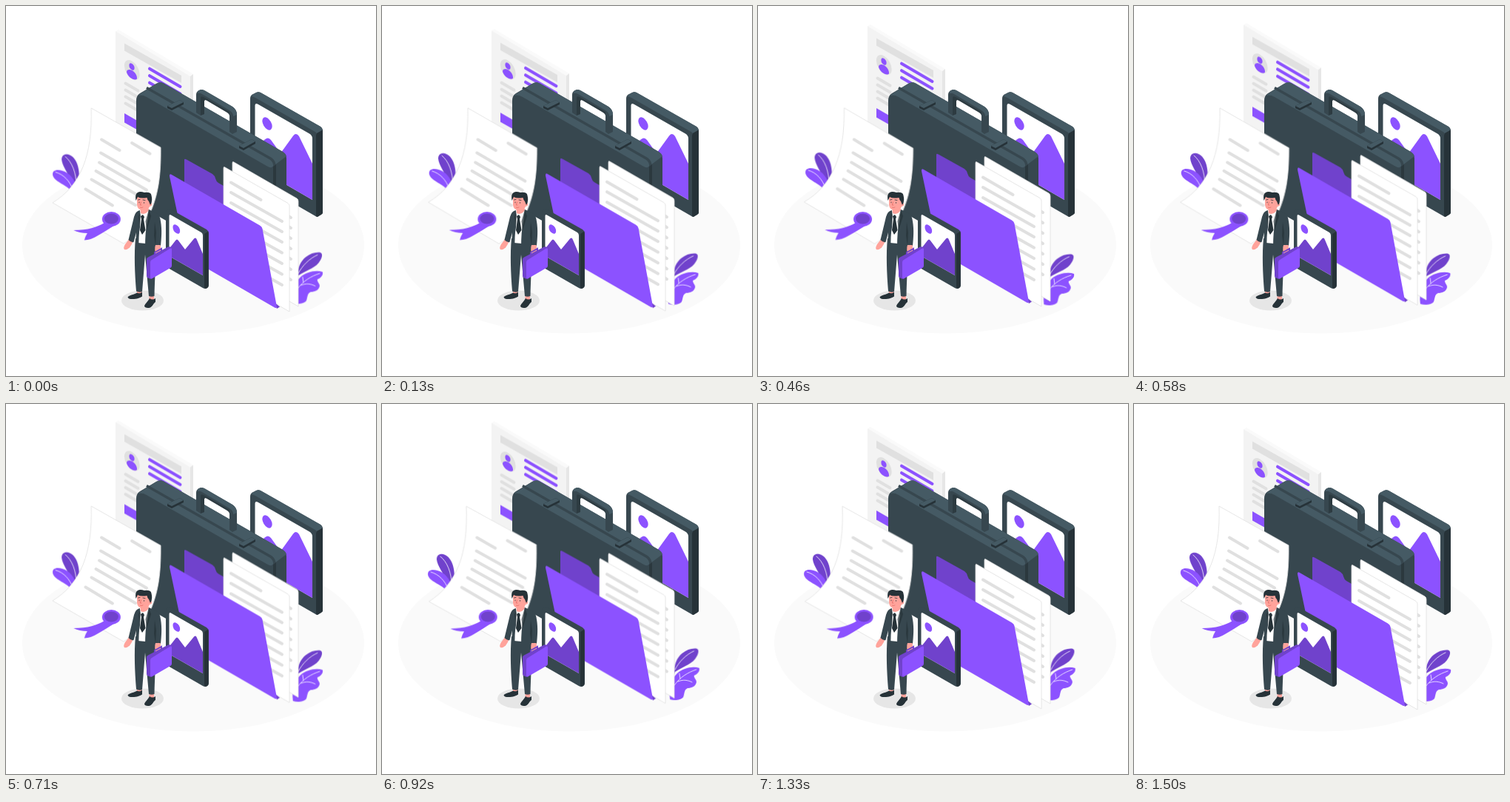
An HTML page for the animation above (1.54 s loop, 500x500 px).

```html
<!DOCTYPE html>
<html lang="en">
<head>
<meta charset="utf-8">
<title>Portfolio</title>
<style>
  html, body { margin: 0; width: 100%; height: 100%; overflow: hidden; background: #fff; }
  svg { display: block; width: 100vw; height: 100vh; }

  .float { animation: float 1540ms -30ms infinite ease-in-out; }
  .sway { animation: sway 1540ms -30ms infinite; transform-box: view-box; }
  .plants { transform-origin: 245.5px 300.5px; }
  .paper { transform-origin: 136px 229px; }

  @keyframes float {
    50% { transform: translateY(-9.6px); }
  }
  @keyframes sway {
    0% { transform: rotate(0); animation-timing-function: ease-out; }
    25% { transform: rotate(1deg); animation-timing-function: ease-in-out; }
    75% { transform: rotate(-1deg); animation-timing-function: ease-in; }
    100% { transform: rotate(0); }
  }

  .violet { fill: #8c52ff; }
  .plum { fill: #7042cc; }
  .ink { fill: #263238; }
  .slate { fill: #37474f; }
  .steel { fill: #455a64; }
  .white { fill: #fff; }
  .grey { fill: #e0e0e0; }
  .skin { fill: #ffa39b; }
  .sheet { fill: #fff; stroke: #e0e0e0; stroke-width: .8; stroke-linejoin: round; }
  .rules { fill: none; stroke: #e0e0e0; stroke-width: 4; stroke-linecap: round; }
  .rules.hot { stroke: #8c52ff; }
  .vein { fill: none; stroke: #fff; stroke-width: .8; stroke-linecap: round; }
</style>
</head>
<body>
<svg viewBox="0 0 500 500">
  <ellipse cx="253" cy="323" rx="231" ry="119.500" fill="#fafafa"/>

  <g class="sway plants">
    <path class="plum" d="M89 238C84 227 76 217 75 208C75 202 79 200 84 201C95 204 101 220 98 241L92 246Z"/>
    <path class="violet" d="M88 250C80 241 65 238 63 229C62 222 69 221 76 223C86 226 92 234 95 244Z"/>
    <path class="vein" d="M80 204C89 211 95 226 95 243M67 225C78 228 86 237 90 248"/>
    <path class="plum" d="M394 367C394 353 398 345 405 339C411 334 418 332 424 332.500C428 333 428 338 425 343C419 354 409 355 395 364Z"/>
    <path class="violet" d="M388 401C386 386 390 373 398 366C406 359 419 356 428 359C429 363 426 367 421 369C420 372 424 374 424 378C423 384 417 386 412 386C407 388 408 393 406 398C403 402 394 403 388 401Z"/>
    <path class="vein" d="M395 361C401 350 410 341 421 336M394 382C402 371 412 365 424 361M402 373L401 366M399 377C406 374 412 375 418 378"/>
  </g>

  <g class="float">
    <path fill="#fafafa" d="M148 34L152 32L253 92L249 95Z"/>
    <path fill="#e6e6e6" d="M249 95L253 92V200H249Z"/>
    <path fill="#f3f3f3" d="M148 34L249 95V250L148 190Z"/>
    <path class="grey" d="M160 50.500L237 94V104L160 60.500Z"/>
    <circle class="grey" r="12" transform="matrix(.866 .5 0 1 170.300 86.500)"/>
    <circle class="violet" r="4.200" transform="matrix(.866 .5 0 1 170 82)"/>
    <path class="violet" d="M163 89.500C163 85 168 85.500 171 87.500C175 90 177.500 94.500 177 98.500C174 101.500 165 97 163 89.500Z"/>
    <path class="rules hot" d="M194 84.700l41.500 24.300M194 94.200l41.500 24.300M194 103.700l41.500 24.300"/>
    <path class="rules" d="M161.500 104.500l17 10M161.500 113.500l17 10M161.500 122.500l17 10M161.500 131.500l17 10"/>
    <path class="violet" d="M160 145L200 168V180L160 157.500Z"/>
  </g>

  <g>
    <path class="slate" d="M330 125Q330 121 333 119.500L338 117Q341 115.500 344 117L425 163Q428 165 428 169V280L420 285L330 233Z"/>
    <path class="steel" d="M331 121.500L338 117Q341 115.500 344 117L425 163Q427 164.500 428 167.500L420 172Q419 170.500 416 169L337 124Q333 122 331 121.500Z"/>
    <path class="ink" d="M420 172L428 167.500V279Q428 281 426 282L421 285Q419 285 419 282V175Z"/>
    <path class="white" d="M336.500 135Q336.500 130 341 133L410 172.500Q414 175 414 179V262L336.500 217Z"/>
    <path class="violet" d="M336.500 193L349 181Q354 176 358 181L371 199L388 175.500Q392 170.500 396 176L414 213V262L336.500 217Z"/>
    <circle class="violet" r="7.700" transform="matrix(.866 .5 0 1 353 159)"/>
  </g>

  <g>
    <path class="slate" d="M176 128Q176 121 181 118L203 105Q208 102 213 104.500L374 197Q379 200 379 206V372H360L176 267Z"/>
    <path class="steel" d="M178 121L203 105Q208 102 213 104.500L374 197Q378 199.500 379 203L359 218Q357 219 352 216L190 123Q184 119.500 178 121Z"/>
    <path fill="none" stroke="#37474f" stroke-width="3.500" d="M190 110.500L358 206.500Q363 210 363 217"/>
    <path class="ink" d="M361 217L365 214V300H361Z" opacity=".7"/>
    <path class="ink" d="M218 135L235 127L240 130V133L224 141L218 138ZM315 189L332 180L337 183V186L321 195L315 192Z"/>
    <path class="steel" d="M218 135L235 127L240 130L224 138ZM315 189L332 180L337 183L321 192Z"/>
    <path class="slate" fill-rule="evenodd" d="M257 144V120Q257 116 260 114.500L263 113Q265 112.500 268 114L306 136Q312 140 312 147V170L306 173L302 170V148Q302 146 299 144L271 127.500Q268 126 268 129V146L263 148Z"/>
    <path class="steel" d="M259 115L263 113Q265 112.500 268 114L306 136Q312 140 312 147L307 149Q307 144 302 141L265 119Q262 117 259 118Z"/>
    <path class="ink" d="M263 124Q263 121 267 123L302 143V148Q302 146 299 144L271 127.500Q268 126 268 129V146L263 148Z" opacity=".55"/>
  </g>

  <g class="sway paper">
    <path class="sheet" d="M115 138L209 191C209.500 228 206 253 196 277C187 297 173 313 159 321L63 266C101 243 117 202 115 138Z"/>
    <path class="rules" d="M129 180.500l24.500 14.500M170 185l24.500 14.500M128 198.500L193.500 236M126 211.500L190 248.500M121.500 223L184 259M115.500 234.500L175 269M107.500 247.500L144 269.500"/>
    <path class="violet" d="M133 293C123 299 111 303 91.500 303Q99 307 110 307Q107 312 106 316.500Q115 316 123 311C132 306 139 301 146 297Z"/>
    <ellipse class="violet" cx="142.500" cy="288" rx="12.500" ry="10"/>
    <ellipse class="plum" cx="142.500" cy="287.500" rx="9.500" ry="7"/>
  </g>

  <g class="float">
    <path class="plum" d="M241 208Q241 206 244 207.500L279 227Q282 229 283 233Q284 237 287 239L346 273V320L241 260Z"/>
    <path class="sheet" d="M306 212Q306 209.500 308 211L393 260Q395 261 395 264V406L306 355Z"/>
    <path class="rules" d="M340 260L385 286M340 274L385 300M340 288L385 314M340 302L385 328M340 316L385 342M340 330L385 356M340 344L385 370"/>
    <path class="sheet" d="M294 219Q294 216.500 296 218L381 266.500Q383 268 383 270V413L294 362Z"/>
    <path class="rules" d="M304 238.500L344.500 262M304 252L373 291M304 266L373 305M304 280L373 319M304 294.500L373 333.500M304 309L373 348M304 323.500L373 362.500M304 338L373 377"/>
    <path class="plum" d="M362 400L370 406.500L366 409Z"/>
    <path class="violet" d="M221 230Q220.500 226 224 228L343 296.500Q346 298 346.500 301L365.500 404Q366.500 409.500 363 407.500L248 341Q244 339 243 335Z"/>
  </g>

  <g>
    <path class="slate" d="M216 279Q216 276 218.500 275Q221 274 224 275.500L271 302Q274 304 274 307V377Q274 380 271 381.500Q269 382.500 266 381L219 354Q216 352 216 349Z"/>
    <path class="ink" d="M268 308L273.500 304.500V377Q274 380 271 381.500Q269 382.500 268 380Z"/>
    <path class="white" d="M220.500 284Q220.500 281 223 282.500L264 306Q266 307.500 266 310V364L220.500 338Z"/>
    <path class="plum" d="M220.500 328L229 317Q231 314 233 317L242 329L254 314.500Q256.500 312 258 316L266 335V364L220.500 338Z"/>
    <circle class="violet" r="5.600" transform="matrix(.866 .5 0 1 230.300 301.500)"/>
  </g>

  <g>
    <ellipse cx="184.500" cy="398" rx="28.500" ry="13.500" fill="#e6e6e6"/>
    <path class="skin" d="M177 382H183.500V390H177ZM193.500 390H200V398H193.500Z"/>
    <path class="ink" d="M177 387.500C174 390 166 390.500 164.500 393.500Q165 396.500 173 396C179 395.500 182 393.500 184 392.500V386.500Q181 389.500 177 387.500ZM194 395C192 399 187 403 187 406Q189 409 195 407.500C199 405 199 402 202 400V395Q198 398 194 395Z"/>
    <path class="slate" d="M175 314L201.500 317C203 340 201 370 200.500 392Q197 393.500 193 392L188 336L184 386Q180 387.500 176 385.500C174 360 173 336 175 314Z"/>
    <path class="skin" d="M167 314L172 317Q170 323 167 326.500Q163 330 160 329Q158 327 161 322Q164 318 167 314Z"/>
    <path class="white" d="M180 279L192 276L198 284L189 321L178 320Z"/>
    <path class="skin" d="M181 270L192 266L193 276Q188 283 182 280Z"/>
    <path class="ink" d="M182 284L185 282L187 285L186 288L188.500 303L184 309L181 303L183 288Z"/>
    <path class="slate" d="M181 276Q175 277 173 285L165.500 316Q169 320 172.500 319L176 306L175 326L179.500 327Q179 310 181 299ZM193 275L203 279.500Q208 282 209 291C211 303 210 314 209 324Q205 326.500 202 324L201.500 326Q195 330 188 327Q188 304 191 291Z"/>
    <path class="ink" d="M193 275L196 284L190 304L188.500 291ZM181 277L179 285L181 299L182 283ZM201 292L203 306L202 324L200 310Z" opacity=".7"/>
    <path class="skin" d="M177 258Q178 254 188 255L196 260V266Q195 275 185 276Q178 276 177 269Z"/>
    <circle class="skin" cx="194.500" cy="268" r="2.600"/>
    <path class="ink" d="M175.500 263Q174 254 178 252Q181 250 187 252Q196 251 196.500 256Q198.500 264 195 269L193 264Q191 262 190.500 259Q182 260.500 178 258Z"/>
    <path fill="none" stroke="#263238" stroke-width=".8" stroke-linecap="round" d="M178.500 262l2.500-.5M185 262l3 .5M180 265v.8M186.500 265.500v.8"/>
    <path fill="none" stroke="#e0655f" stroke-width=".7" stroke-linecap="round" d="M182.500 265l-1.200 4h1.700M181.500 272.300Q183.500 273 185 272"/>
    <path class="skin" d="M202 323H208.500Q210 329 208 333L203 335Q200 330 202 323Z"/>
    <path fill="none" stroke="#7042cc" stroke-width="2" d="M201 338V333L210 328V333"/>
    <path class="plum" d="M190 342Q190 340.500 192 339.500L219 325.500Q222 324.500 224 327L195.500 345V369L191 367Q190 366 190 364Z"/>
    <path class="violet" d="M195 346Q195 344 197 343L222 327.500Q224 326.500 224 329V351Q224 353 222 354L197 368.500Q195 369.500 195 367Z"/>
  </g>
</svg>
</body>
</html>
```
